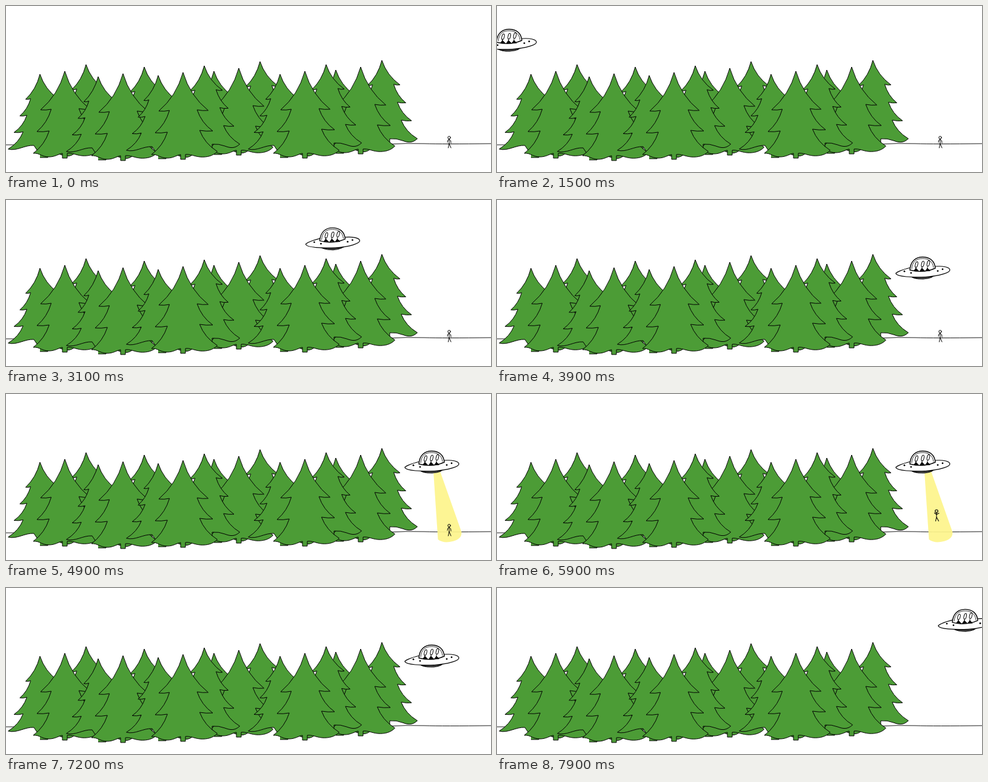
Write an HTML page that moves like this. It is 800 px wide and 275 px high and loops after 8 s.

```html
<!DOCTYPE html>
<html lang="en">
<head>
<meta charset="utf-8">
<title>Forest visit</title>
<style>
  html, body { margin: 0; width: 100%; height: 100%; overflow: hidden; background: #fff; }
  svg { display: block; }
  .line { fill: none; stroke: #000; stroke-linecap: round; stroke-linejoin: round; }
</style>
</head>
<body>
<svg width="800" height="275" viewBox="0 0 800 275">
  <path class="line" stroke-width=".9" d="M0 230H60M630 229Q660 227 690 228T800 228"/>
  <g id="forest" fill="#4c9c36" stroke="#000" stroke-linejoin="round"></g>
  <path id="beam" fill="#fdf58c" fill-opacity=".93" d="M705 128L712.5 241Q722 248 737 244Q752 240 751.5 229L716 128Z"/>
  <g id="walker" class="line">
    <circle cx="731" cy="218" r="2.2"/>
    <path d="M731 220V228M728 226L729 222L731 221L733.5 223L734 227M731 228L729.5 235M731 228L734 235"/>
  </g>
  <g id="lifted" class="line" stroke-width="1.1">
    <circle cx="4" cy="3" r="2.3"/>
    <path d="M4 5.5V13M.5 6L4 8.5L8 6.5M4 13L2.500 19.500M4 13L7.5 19.5"/>
  </g>
  <g id="ufo" class="line" stroke-width="1.2">
    <path fill="#222" d="M-26 5Q-18 13 0 13Q16 12 21 4Z"/>
    <path stroke="#888" stroke-width=".6" d="M-14 10H12M-10 12H8"/>
    <path fill="#fff" d="M-21 -6C-38 -2 -46 3 -45 4C-43 9 -18 10.500 4 9.500C28 8 44 2 44 -2C44 -7 32 -9 20 -8Z"/>
    <path fill="#fff" stroke-width="1.4" d="M-22 -2C-21 -16 -13 -23.500 -1 -23.500C11 -23.500 19 -17 20 -5Q0 4 -22 -2Z"/>
    <path stroke-width=".8" d="M-19 -4C-18 -16 -11 -21 -1 -21C9 -21 16 -16 17 -6"/>
    <g id="crew" stroke-width="1"></g>
    <g id="ports" fill="#000" stroke="none"></g>
  </g>
</svg>
<script>
const el = id => document.getElementById(id);

// Half a tree: n flared tiers with evenly growing tips, then the skirt.
// Tip i lies at x0 + i * dx, y0 + i * dy; each tier starts at `notch` of the tip above.
function half(n, [x0, dx], [y0, dy], notch, skirt) {
  let x = 0, y = 0, d = "M0 0";
  for (let i = 1; i <= n; i++) {
    const tx = x0 + i * dx, ty = y0 + i * dy;
    d += `Q${x + (tx - x) * .28} ${y + (ty - y) * .62} ${tx} ${ty}`;
    if (i === n) break;
    [x, y] = [tx * notch, ty - 1];
    d += `Q${(tx + x) / 2} ${ty + 1} ${x} ${y}`;
  }
  return d + skirt;
}

const front =
  half(3, [34, 7.5], [29, 34], .56, "C50 138 40 141 28 140C18 139 12 135 4 136V144H0") +
  half(3, [-34, -6], [28, 36], .56, "C-42 135 -38 142 -26 142C-16 142 -10 137 -4 136V144H0");
const back =
  half(4, [20.5, 9.5], [11, 29.7], .65, "C50 138 42 136 34 133Q24 129 13 130V138H0") +
  half(4, [-14, -9.6], [14, 27.5], .65, "C-38 128 -25 117 -10 118L0 133");

// Each clump is a front tree with one behind on either side.
const tree = (d, x, y) => `<path d="${d}" transform="translate(${x} ${y})"/>`;
const clumps = [[97, 108], [193, 112], [384, 103], [292, 110], [585, 101], [493, 108]];
el("forest").innerHTML = clumps.map(([x, y]) =>
  tree(back, x - 41, y + 5) + tree(back, x + 35, y - 11) + tree(front, x, y)).join("");

el("crew").innerHTML = [-11, -1, 8].map((x, i) =>
  `<ellipse cx="${x}" cy="${-11 - i}" rx="2" ry="4.8" transform="rotate(14 ${x} -11)"/>` +
  `<path d="M${x - 1} -7V-4"/><path fill="#000" d="M${x - 4} -1L${x - 1} -5L${x + 3} -1Z"/>`).join("");
el("ports").innerHTML = [-31, -20, 24, 32].map(x =>
  `<circle cx="${x}" cy="${4 - x * x / 180 - x / 20}" r="1.4"/>`).join("");

const START = 1500, BEAM_ON = 4900, LIFT = 5900, LIFT_END = 6700, BEAM_OFF = 7200, LEAVE = 7700, LOOP = 8000;
const STEP = 200, ARRIVED = 12;
const stepsSince = (t, from) => Math.floor((t - from) / STEP);

// Turning points of the swooping flight: [step, y]
const swoops = [[0, 62], [3, 62], [5, 37], [7, 117], [9, 50], [ARRIVED, 118]];

function ufoAt(t) {
  const out = Math.max(0, stepsSince(t, LEAVE) + 1);
  const n = Math.min(stepsSince(t, START), ARRIVED);
  const x = 21 + 682 * (1 - (1 - n / ARRIVED) ** 1.3);
  const k = Math.max(1, swoops.findIndex(s => s[0] >= n));
  const [[n0, y0], [n1, y1]] = [swoops[k - 1], swoops[k]];
  const y = y0 + (y1 - y0) * Math.sin((n - n0) / (n1 - n0) * Math.PI / 2);
  return [x + 35 * out, y - 24 * out ** 1.3];
}

function liftAt(t) {
  const n = stepsSince(t, LIFT);
  return [721 - 4 * n, 191 - 19.5 * n];
}

const show = (id, on) => el(id).style.display = on ? "" : "none";

function place(id, on, at, t) {
  show(id, on);
  if (on) el(id).setAttribute("transform", `translate(${at(t)})`);
}

function draw(t) {
  place("ufo", t >= START, ufoAt, t);
  place("lifted", t >= LIFT && t < LIFT_END, liftAt, t);
  show("walker", t < LIFT);
  show("beam", t >= BEAM_ON && t < BEAM_OFF);
}

const begin = performance.now();
function tick() {
  draw((performance.now() - begin) % LOOP);
  requestAnimationFrame(tick);
}
tick();
</script>
</body>
</html>
```
